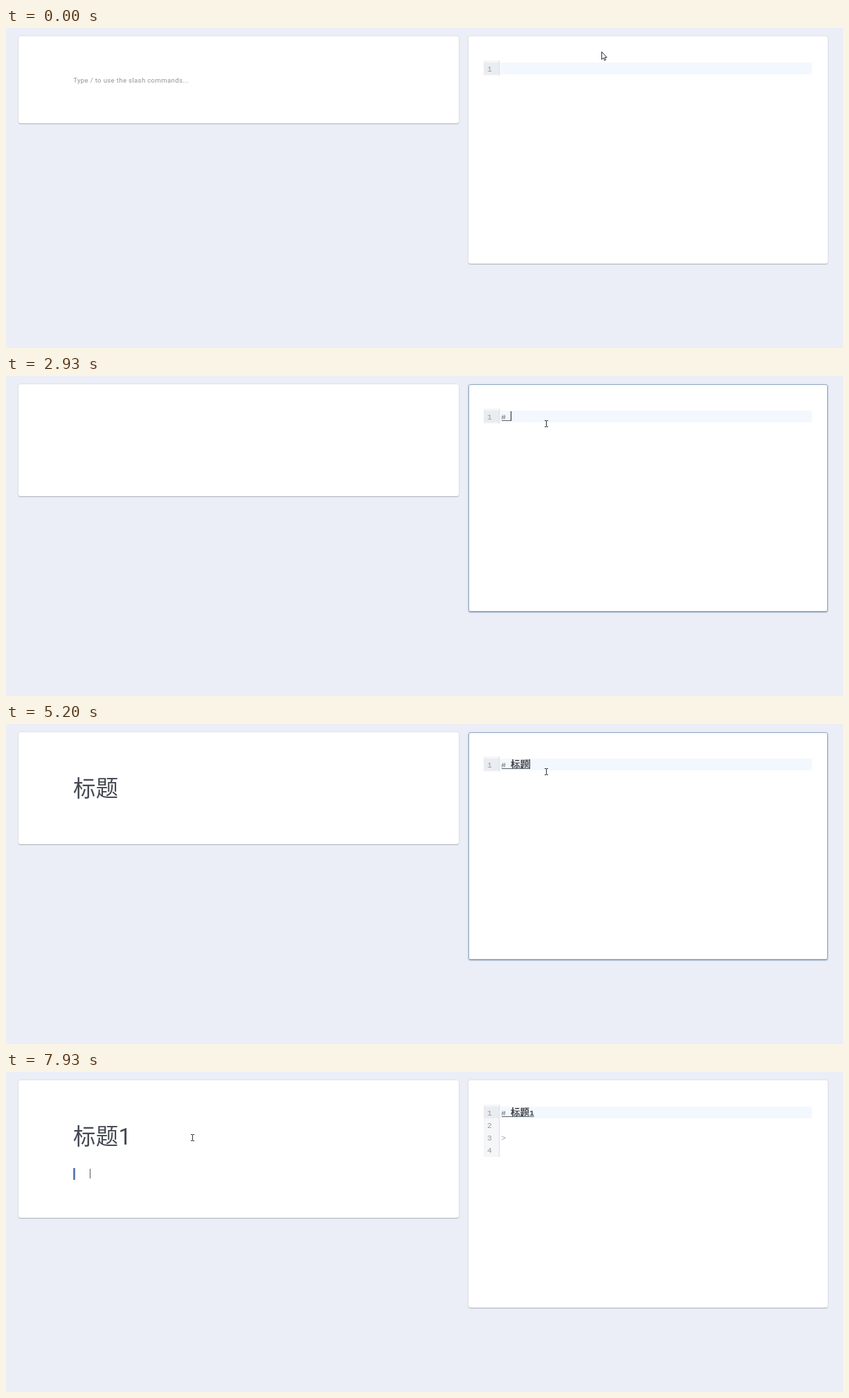
Animation, 1209 px wide and 463 px high, one loop 8000 ms. Source, as an HTML page:

```html
<!DOCTYPE html>
<html lang="zh">
<head>
<meta charset="utf-8">
<title>Markdown editor</title>
<style>
html, body { margin: 0; width: 100%; height: 100%; overflow: hidden; background: #ebeef6; }
.panel {
  position: absolute; top: 12px; box-sizing: border-box; background: #fff; border-radius: 3px;
  box-shadow: 0 1px 1px rgba(60, 65, 75, .32), 0 0 2px rgba(60, 65, 75, .18);
}
#left { left: 18px; width: 636px; }
#right { left: 668px; width: 519px; height: 329px; }
#focus {
  position: absolute; inset: 0; border: 1px solid #93abc2; border-radius: 3px;
  box-shadow: 0 1px 2px rgba(110, 150, 185, .55);
}
svg { position: absolute; left: 0; top: 0; width: 1209px; height: 463px; }
text { white-space: pre; }
.prose { font: 9.62px Roboto, "Noto Sans CJK SC", sans-serif; letter-spacing: .34px; fill: #92948f; }
#title { font-size: 32.4px; fill: #454952; }
.code, .num { font: 11.4px "Liberation Mono", monospace; fill: #666; }
.num { fill: #999; text-anchor: middle; }
.head { font-weight: bold; fill: #404347; }
.cjk { font-family: "Noto Sans CJK SC", "Noto Sans CJK", sans-serif; font-size: 13.5px; }
#pinyin { font: bold 12.3px "Liberation Sans", sans-serif; fill: #1c5db8; }
.cand { font: 12px "Noto Sans CJK SC", "Noto Sans CJK", sans-serif; fill: #1a6ed8; }
.cand tspan { font: 10.5px "Liberation Mono", monospace; }
.cand.first { fill: #ee1c1c; }
.chevron { fill: none; stroke: #3f7fd8; }
.beam { fill: none; stroke: #333; }
</style>
</head>
<body>
<div id="left" class="panel"></div>
<div id="right" class="panel"><div id="focus"></div></div>

<svg viewBox="0 0 1209 463">
  <!-- preview -->
  <text id="hint" class="prose" x="97.2" y="78.5">Type / to use the slash commands...</text>
  <text id="title" class="prose" x="97" y="105"></text>
  <text id="para" class="prose" x="97.2" y="150.5"></text>
  <rect id="bar" x="97" y="139" width="3" height="17" fill="#5e81b5"/>
  <rect id="caretL" width="1" fill="#55585e"/>

  <!-- code editor -->
  <rect id="gutter" x="690" y="47" width="23" fill="#f5f6f8"/>
  <rect x="690" y="50" width="23" height="17" fill="#e9ecf1"/>
  <rect id="edge" x="712" y="47" width="1" fill="#dcdee2"/>
  <rect x="713" y="50" width="451" height="17" fill="#f3f8fe"/>
  <g id="nums"></g>
  <text id="hash" class="code" x="715.3" y="63"></text>
  <text class="code head" y="63" x="729"><tspan id="word" class="cjk"></tspan><tspan id="digit"></tspan></text>
  <rect id="under" x="716" y="64" height="1" fill="#5b636b"/>
  <text id="quote" class="code" x="715.3" y="99"></text>
  <rect id="caretR" y="51" width="1" height="14" fill="#222"/>

  <!-- input method popup -->
  <g id="ime">
    <rect id="frame" x="729.5" y="69.5" height="42" fill="#fff" stroke="#ccd4e2"/>
    <rect id="rule" x="730" y="90" height="1" fill="#e6eaf2"/>
    <text id="pinyin" x="735.7" y="84"></text>
    <rect id="caretI" y="73" width="1" height="13" fill="#333"/>
    <g id="cands"></g>
    <g id="arrows">
      <path class="chevron" d="M-16.5 97l-3 3.500l3 3.500" opacity=".5"/>
      <path class="chevron" d="M-10.500 97l3 3.500l-3 3.500"/>
    </g>
  </g>

  <!-- mouse -->
  <g id="mouse">
    <path id="arrow" d="M.5 .5v11l2.500-2.300 1.700 3.700 1.700-.8-1.700-3.500h3.300z" fill="#fff" stroke="#2b2b35"/>
    <path id="beam" class="beam" d="M-2.500-4.500h2l.5.5.5-.5h2M-2.500 4.500h2l.5-.5.5.5h2M0-4v8"/>
  </g>
</svg>

<script>
const $ = id => document.getElementById(id);
const TICK = 200 / 3, TICKS = 120;

const start = {
  height: 126, hint: true, title: '', para: '', bar: false, caretL: null,
  lines: 1, hash: '', word: '', digit: '', quote: '', under: 0, caretR: 0,
  pinyin: '', cands: ''
};
const titleCaret = [181, 73, 40];
const paraCaret = x => [x, 140, 14];

// Each entry changes part of the state from its tick on.
const script = [
  [8, { caretR: 715 }],
  [16, { height: 162, hint: false, hash: '#', under: 722, caretR: 722 }],
  [25, { caretR: 0 }],
  [26, { hash: '# ', under: 729, caretR: 729 }],
  [35, { caretR: 0 }],
  [44, { caretR: 729 }],
  [53, { caretR: 0 }],
  [62, { under: 735, caretR: 735, pinyin: 'b', cands: '吧 把 包 并 白' }],
  [68, { pinyin: 'bi', cands: '比 必 笔 避 闭' }],
  [71, { caretR: 0, pinyin: 'bia', cands: '表 标 彪 飙 镖' }],
  [73, { pinyin: 'biao' }],
  [74, { pinyin: "biao't", cands: '标题 表态 标体 表体 标贴' }],
  [76, { pinyin: "biao'ti", cands: '标题 表题 标体 表体 标提' }],
  [78, { pinyin: '', title: '标题', word: '标题', under: 756, caretR: 756 }],
  [83, { title: '标题1', digit: '1', under: 763, caretR: 762 }],
  [92, { caretR: 0 }],
  [95, { caretL: titleCaret }],
  [104, { caretL: null }],
  [106, { height: 199, lines: 4, caretL: paraCaret(97) }],
  [113, { para: '>', quote: '\\>', caretL: paraCaret(103) }],
  [119, { para: '', bar: true, quote: '>', caretL: paraCaret(121) }]
];

const clamp = v => Math.min(1, Math.max(0, v));
const ease = v => v * v * (3 - 2 * v);
const show = (id, on) => $(id).style.display = on ? '' : 'none';
const set = (id, attrs) => { for (const k in attrs) $(id).setAttribute(k, attrs[k]); };

function drawPopup(s) {
  show('ime', s.pinyin);
  if (!s.pinyin) return;
  const words = s.cands.split(' ');
  const pitch = 19.7 + 12 * words[0].length + (words[0].length - 1) * .4;
  const width = 29 + pitch * 5;
  $('pinyin').textContent = s.pinyin;
  set('caretI', { x: Math.round(735.6 + $('pinyin').getComputedTextLength()) });
  set('frame', { width: Math.round(width) });
  set('rule', { width: Math.round(width) - 1 });
  set('arrows', { transform: `translate(${Math.round(729 + width)} 0)` });
  $('cands').innerHTML = words.map((w, i) =>
    `<text class="cand${i ? '' : ' first'}" x="${735 + pitch * i}" y="104"><tspan>${i + 1}.</tspan>${w}</text>`
  ).join('');
}

function drawMouse(n) {
  const a = ease(clamp(n / 7)), b = ease(clamp((n - 88) / 7));
  const x = Math.round(860 - 80 * a - 511 * b), y = Math.round(34 + 35 * a + 26 * b);
  const text = y > 50 && (x > 713 || x < 654);
  show('arrow', !text);
  show('beam', text);
  set('mouse', { transform: `translate(${text ? x + .5 : x} ${y})` });
}

function draw(n) {
  const s = { ...start };
  for (const [tick, change] of script) if (tick <= n) Object.assign(s, change);

  $('left').style.height = s.height + 'px';
  $('focus').style.opacity = clamp((n - 9) / 4) - clamp((n - 97) / 4);
  show('hint', s.hint);
  show('bar', s.bar);
  for (const id of ['title', 'para', 'hash', 'word', 'digit', 'quote']) $(id).textContent = s[id];
  set('quote', { opacity: s.bar ? .65 : 1 });

  show('caretL', s.caretL);
  if (s.caretL) {
    const [x, y, height] = s.caretL;
    set('caretL', { x, y, height });
  }
  show('caretR', s.caretR);
  set('caretR', { x: s.caretR });
  set('under', { width: Math.max(0, s.under - 716) });

  const height = 4 + 18 * s.lines;
  set('gutter', { height });
  set('edge', { height });
  $('nums').innerHTML = Array.from({ length: s.lines }, (_, i) =>
    `<text class="num" x="698.5" y="${63 + 18 * i}">${i + 1}</text>`).join('');

  drawPopup(s);
  drawMouse(n);
}

const t0 = performance.now();
let last = -1;
function loop() {
  // The small lead absorbs rounding at tick borders.
  const n = Math.floor((performance.now() - t0 + 5) / TICK) % TICKS;
  if (n !== last) draw(last = n);
  requestAnimationFrame(loop);
}
loop();
</script>
</body>
</html>
```
